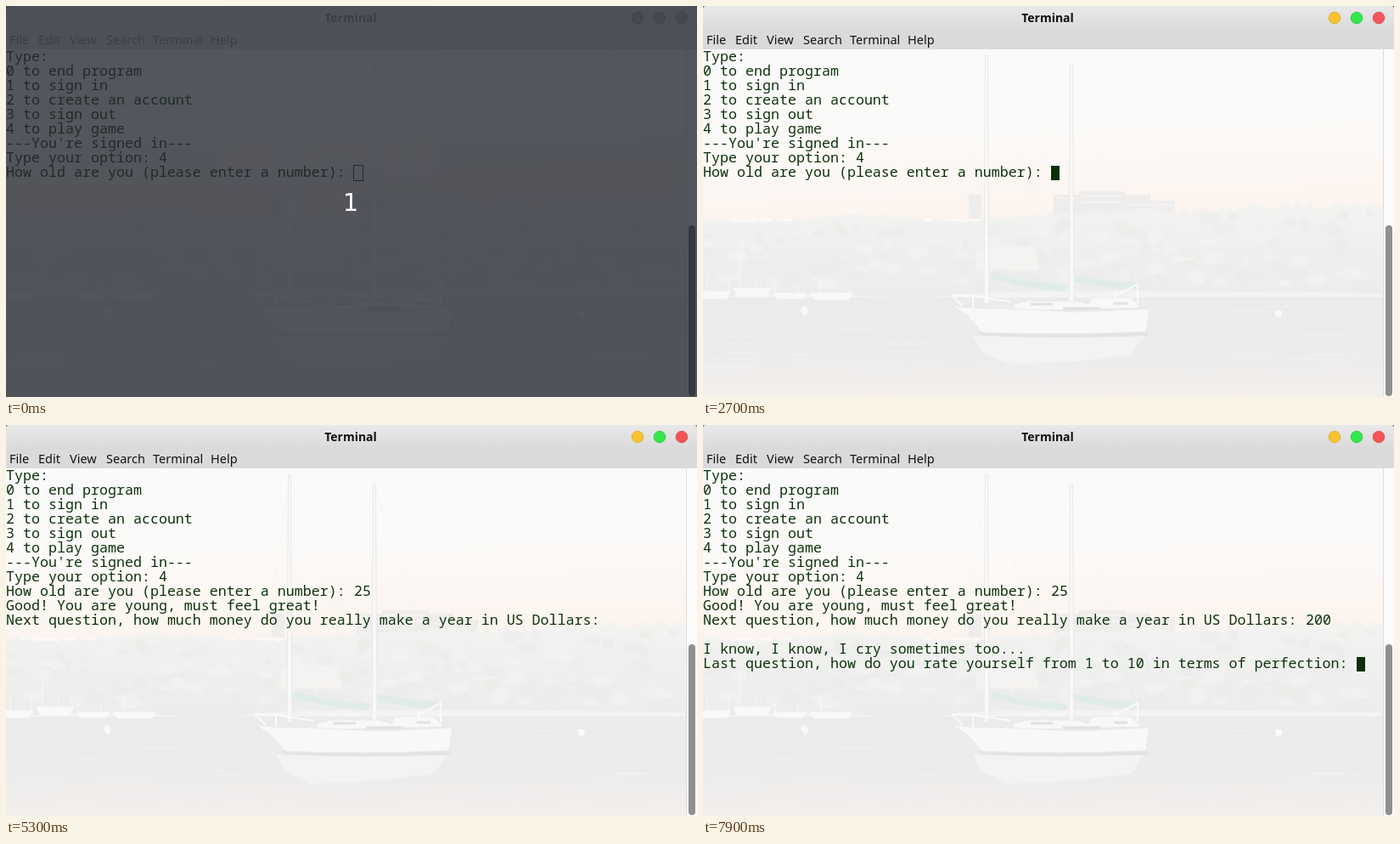
Write an HTML page that moves like this. It is 814 px wide and 460 px high and loops after 8 s.

```html
<!DOCTYPE html>
<html lang="en">
<head>
<meta charset="utf-8">
<title>Terminal</title>
<style>
  html, body { margin: 0; width: 100%; height: 100%; overflow: hidden; background: #fafafa; }
  svg { display: block; width: 814px; height: 460px; }
  .ui { font: 14.5px "Noto Sans", "Open Sans", sans-serif; }
  .title { font-weight: 700; font-size: 14px; text-anchor: middle; }
  .term { font: 16.667px "Noto Sans Mono", "DejaVu Sans Mono", monospace; fill: #0d330b; white-space: pre; }
  .count { font: 29px "DejaVu Sans", sans-serif; fill: #fff; text-anchor: middle; }

  .run { animation: 8s step-end infinite; }
  .dim { animation-name: dim; }
  .idle { animation-name: idle; }
  .hollow { animation-name: hollow; }
  .caret { animation-name: caret; }
  .mouse { animation-name: mouse; }
  .age1 { animation-name: age1; }
  .age2 { animation-name: age2; }
  .money { animation-name: money; }
  .pay1 { animation-name: pay1; }
  .pay2 { animation-name: pay2; }
  .last { animation-name: last; }

  @keyframes dim { 0% { opacity: 1 } 6.25%, 100% { opacity: 0 } }
  @keyframes idle { 0% { opacity: 1 } 25% { opacity: .5 } 26.25%, 100% { opacity: 0 } }
  @keyframes hollow { 0% { opacity: 1 } 25%, 100% { opacity: 0 } }
  @keyframes mouse {
    0% { opacity: 0; transform: translate(305px, 434px) }
    15% { opacity: 1; transform: translate(305px, 434px) }
    16.25% { opacity: 1; transform: translate(349px, 332px) }
    17.5% { opacity: 1; transform: translate(389px, 236px) }
    20% { opacity: 1; transform: translate(404px, 219px) }
    21.25% { opacity: 1; transform: translate(427px, 198px) }
    22.5% { opacity: 1; transform: translate(439px, 187px) }
    33.75%, 100% { opacity: 0; transform: translate(439px, 187px) }
  }
  @keyframes caret {
    0% { opacity: 0; transform: translate(410px, 188px) }
    25% { opacity: 1; transform: translate(410px, 188px) }
    37.5% { opacity: 1; transform: translate(420px, 188px) }
    43.75% { opacity: 1; transform: translate(430px, 188px) }
    45% { opacity: 1; transform: translate(710px, 222px) }
    51.25% { opacity: 0; transform: translate(710px, 222px) }
    58.75% { opacity: 1; transform: translate(710px, 222px) }
    66.25% { opacity: 0; transform: translate(710px, 222px) }
    70% { opacity: 1; transform: translate(720px, 222px) }
    73.75% { opacity: 1; transform: translate(740px, 222px) }
    81.25% { opacity: 0; transform: translate(740px, 222px) }
    83.75% { opacity: 1; transform: translate(740px, 222px) }
    87.5% { opacity: 1; transform: translate(770px, 273px) }
    91.25% { opacity: 0; transform: translate(770px, 273px) }
    98.75%, 100% { opacity: 1; transform: translate(770px, 273px) }
  }
  @keyframes age1 { 0% { opacity: 0 } 37.5%, 100% { opacity: 1 } }
  @keyframes age2 { 0% { opacity: 0 } 43.75%, 100% { opacity: 1 } }
  @keyframes money { 0% { opacity: 0 } 45%, 100% { opacity: 1 } }
  @keyframes pay1 { 0% { opacity: 0 } 70%, 100% { opacity: 1 } }
  @keyframes pay2 { 0% { opacity: 0 } 73.75%, 100% { opacity: 1 } }
  @keyframes last { 0% { opacity: 0 } 87.5%, 100% { opacity: 1 } }
</style>
</head>
<body>
<svg viewBox="0 0 814 460">
  <defs>
    <linearGradient id="sky" x2=".12" y2="1">
      <stop offset="0" stop-color="#f9fafa"/>
      <stop offset=".55" stop-color="#fcfaf8"/>
      <stop offset="1" stop-color="#fcf4ef"/>
    </linearGradient>
    <linearGradient id="wood" x2="0" y2="1">
      <stop offset="0" stop-color="#f3f3f2"/>
      <stop offset=".5" stop-color="#eff0ee"/>
      <stop offset="1" stop-color="#ececec"/>
    </linearGradient>
    <linearGradient id="water" x2="0" y2="1">
      <stop offset="0" stop-color="#ebebeb"/>
      <stop offset=".55" stop-color="#ececec"/>
      <stop offset="1" stop-color="#f3efed"/>
    </linearGradient>
    <linearGradient id="bar" x2="0" y2="1">
      <stop offset="0" stop-color="#e9e9e9"/>
      <stop offset="1" stop-color="#dadada"/>
    </linearGradient>
  </defs>

  <!-- wallpaper -->
  <rect y="51" width="801" height="200" fill="url(#sky)"/>
  <g fill="#eeedec">
    <path d="M313 222h15v28h-15zM413 222h30v-4h55v4h29v7h29v20h-143z"/>
    <path d="M416 226h24M447 224h46M447 231h46M502 234h50" stroke="#f6f4f3" stroke-width="2"/>
  </g>
  <path id="trees" fill="url(#wood)"/>
  <g id="leaves"></g>
  <path d="M322 290l20-10 48 4 6 26h-74z" fill="#f5f3f1"/>
  <path d="M0 344q90-8 180-3t130-2 490-1v8H0z" fill="#f3f3f2"/>
  <rect y="343" width="801" height="117" fill="url(#water)"/>
  <g id="ripples"></g>
  <g stroke="#f9f9f9" fill="#f9f9f9">
    <path d="M5 344v-26M30 340v-22M43 340v-48M62 342v-20M85 342v-16M112 342v-14M139 342v-18" fill="none"/>
    <path d="M0 336h32l-4 8H0zM36 332h44l-5 9H40zM84 338h38l-4 6H88zM126 338h50l-5 7h-40z"/>
    <path d="M115 357l5-4 4 6-4 6z"/>
  </g>
  <circle cx="678" cy="362" r="4" fill="#fafafa"/>
  <path d="M318 388h202l-16 22-60 8-84 4-30-14z" fill="#f3f3f2"/>
  <path d="M324 384h200v4q-100 4-194 0z" fill="#e2e4e3"/>
  <g fill="none" stroke="#f4f4f3">
    <path d="M334 58l-39 284M334 58l88 280M434 70l-78 276M434 70l80 262" stroke-width=".7"/>
  </g>
  <path d="M340 317q40 12 88 15M438 320q36 9 72 9" fill="none" stroke="#e0ece7" stroke-width="8"/>
  <g fill="#f8f8f8" stroke="#e9e9e8">
    <path d="M332.500 58h3l1.500 292h-6zM432.500 70h3l1.500 280h-6z"/>
    <path d="M366 351l16-4h58l14 4 4-8h46l12 12-150 4z"/>
    <path d="M292 352q18 4 62 4l88 4 84-4-4 27q-98 5-193 1l-18-20z"/>
  </g>
  <path d="M293 340l25 1 44 7M293 340l13 13M318 341v14M488 340l24-13M512 326v24M486 336v16" fill="none" stroke="#fafafa" stroke-width="2"/>
  <path d="M386 351h26M424 356h44M484 350h16" stroke="#dfe2e1" stroke-width="3"/>

  <!-- scrollbar -->
  <rect x="801" y="51" width="13" height="409" fill="#fcfcfc"/>
  <path d="M801.500 51v409" stroke="#dcdcdc"/>
  <rect x="804" y="258" width="8" height="201" rx="4" fill="#8f8f8f"/>

  <!-- window frame -->
  <rect width="814" height="51" fill="#dadada"/>
  <rect width="814" height="28" fill="url(#bar)"/>
  <g class="ui" data-bar="#111"></g>
  <g stroke-width="1">
    <circle cx="744" cy="14" r="6.800" fill="#f9c22f" stroke="#deb03a"/>
    <circle cx="770" cy="14" r="6.800" fill="#35e74a" stroke="#35c947"/>
    <circle cx="796" cy="14" r="6.800" fill="#f4545a" stroke="#d9545a"/>
  </g>
  <g class="run idle">
    <rect width="814" height="51" fill="#e2e2e2"/>
    <g class="ui" data-bar="#8a8a8a"></g>
    <g fill="#b7b9b4" stroke="#a3aaa3">
      <circle cx="744" cy="14" r="6.800"/>
      <circle cx="770" cy="14" r="6.800"/>
      <circle cx="796" cy="14" r="6.800"/>
    </g>
    <rect x="804" y="258" width="8" height="201" rx="4" fill="#777"/>
  </g>
  <path d="M0 0h4q-4 0-4 4zM814 0h-4q4 0 4 4z" fill="#5f8580"/>

  <g class="term" id="term"></g>
  <rect class="run hollow" x="409.500" y="187.500" width="11" height="18" fill="none" stroke="#0d330b"/>
  <rect class="run caret" width="10" height="17" fill="#0a2f08"/>
  <g class="run mouse" fill="none">
    <path d="M1 1.500h2l1 1 1-1h2M4 2.500v12M1 15.500h2l1-1 1 1h2" stroke="#fff" stroke-width="2.500"/>
    <path d="M1 1.500h2l1 1 1-1h2M4 2.500v12M1 15.500h2l1-1 1 1h2" stroke="#111"/>
  </g>

  <g class="run dim">
    <rect width="814" height="460" fill="#242831" fill-opacity=".78"/>
    <text class="count" x="406" y="241">1</text>
  </g>
</svg>
<script>
  const $ = id => document.getElementById(id);

  function add(parent, tag, attrs, text = "") {
    const el = document.createElementNS("http://www.w3.org/2000/svg", tag);
    for (const key in attrs) el.setAttribute(key, attrs[key]);
    el.textContent = text;
    parent.append(el);
  }

  const menu = { File: 4, Edit: 38, View: 75, Search: 118, Terminal: 173, Help: 241 };
  for (const bar of document.querySelectorAll("[data-bar]")) {
    const fill = bar.dataset.bar;
    add(bar, "text", { class: "title", x: 406, y: 19, fill }, "Terminal");
    for (const name in menu) add(bar, "text", { x: menu[name], y: 45, fill }, name);
  }

  // row, column, text, class that reveals it
  const lines = [
    [0, 0, "Type:"],
    [1, 0, "0 to end program"],
    [2, 0, "1 to sign in"],
    [3, 0, "2 to create an account"],
    [4, 0, "3 to sign out"],
    [5, 0, "4 to play game"],
    [6, 0, "---You're signed in---"],
    [7, 0, "Type your option: 4"],
    [8, 0, "How old are you (please enter a number):"],
    [8, 41, "2", "age1"],
    [8, 42, "5", "age2"],
    [9, 0, "Good! You are young, must feel great!", "money"],
    [10, 0, "Next question, how much money do you really make a year in US Dollars:", "money"],
    [10, 71, "2", "pay1"],
    [10, 72, "00", "pay2"],
    [12, 0, "I know, I know, I cry sometimes too...", "last"],
    [13, 0, "Last question, how do you rate yourself from 1 to 10 in terms of perfection:", "last"]
  ];
  for (const [row, col, text, when] of lines)
    add($("term"), "text", { x: col * 10, y: 65 + row * 17, class: when ? "run " + when : "" }, text);

  let seed = 7;
  const rnd = () => (seed = seed * 16807 % 2147483647) / 2147483647;

  const ridge = x => x < 330 ? 247 + 4 * Math.sin(x / 38) : 247 - 20 * Math.min(1, (x - 330) / 400);
  let d = "M0 345";
  for (let x = 0; x <= 801; x += 5) d += `L${x} ${(ridge(x) + rnd() * (x > 540 ? 12 : 5)).toFixed(1)}`;
  $("trees").setAttribute("d", d + "L801 345z");

  for (let i = 0; i < 170; i++) {
    const cx = rnd() * 790, top = ridge(cx) + 14;
    add($("leaves"), "ellipse", {
      cx, cy: top + rnd() * (330 - top), rx: 5 + rnd() * 9, ry: 3 + rnd() * 5,
      fill: rnd() < .5 ? "#f4f4f2" : "#ebecea", opacity: .6
    });
  }
  for (let i = 0; i < 90; i++) {
    const y = 352 + rnd() * 106, w = 15 + rnd() * 60;
    add($("ripples"), "rect", {
      x: rnd() * (801 - w), y, width: w, height: 1.5,
      fill: y > 425 ? "#f8ece6" : "#f1f1f0", opacity: .7
    });
  }
</script>
</body>
</html>
```
